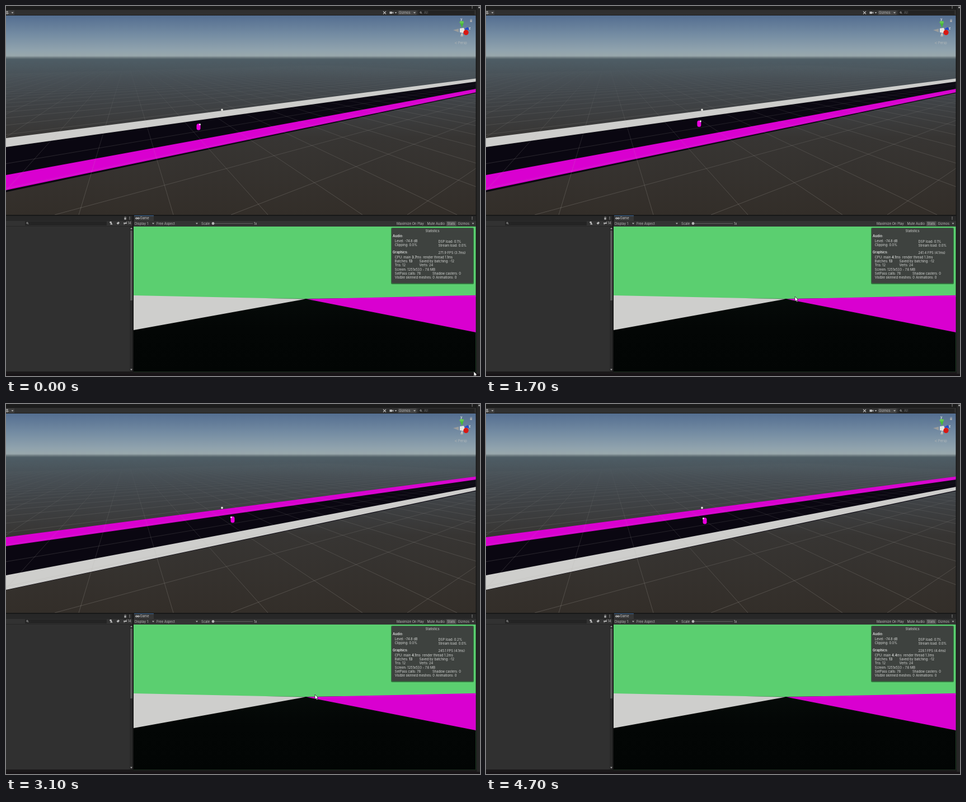
Recreate the animation shown at these times as an HTML page with a canvas. Size 847 by 661 pixels, loop 4.8 s.

```html
<!DOCTYPE html>
<html lang="en">
<head>
<meta charset="utf-8">
<title>Corridor editor</title>
<style>
html, body { margin: 0; width: 100%; height: 100%; overflow: hidden; background: #191919; }
canvas { display: block; }
</style>
</head>
<body>
<canvas id="stage" width="847" height="661"></canvas>
<script>
const c = document.getElementById('stage').getContext('2d');
const LOOP = 4800, FLIP = 2350;
const PINK = '#d900d0', WHITE = '#cececc', TEXT = '#b9b9b9';

// time, value(s)
const walk = [[0, 344], [1120, 344], [1200, 348], [2100, 407], [2340, 420], [2400, 419], [3100, 405], [3800, 391], [4800, 391]];
const mouse = [[0, 836, 653], [100, 830, 645], [600, 552, 519], [3700, 552, 519], [4000, 750, 416], [4200, 846, 366]];
// start, dsp, fps, frame ms, render ms
const stats = [
  [0, '0.1', '271.9', '3.7', '1.1'], [600, '0.2', '246.9', '4.1', '1.2'],
  [1700, '0.1', '241.4', '4.1', '1.3'], [2300, '0.2', '241.4', '4.1', '1.3'],
  [2700, '0.2', '245.1', '4.1', '1.2'], [3600, '0.2', '248.2', '4.0', '1.2'],
  [4400, '0.1', '228.1', '4.4', '1.3']
];

function track(keys, t, n = 1) {
  let i = 1;
  while (i < keys.length - 1 && keys[i][0] < t) i++;
  const a = keys[i - 1], b = keys[i];
  const k = Math.min(1, Math.max(0, (t - a[0]) / (b[0] - a[0])));
  return a[n] + (b[n] - a[n]) * k;
}
function box(x, y, w, h, fill) {
  c.fillStyle = fill;
  c.fillRect(x, y, w, h);
}
function poly(fill, ...p) {
  c.fillStyle = fill;
  c.beginPath();
  for (let i = 0; i < p.length; i += 2) c.lineTo(p[i], p[i + 1]);
  c.closePath();
  c.fill();
}
function dot(x, y, rx, ry, fill) {
  c.fillStyle = fill;
  c.beginPath();
  c.ellipse(x, y, rx, ry, 0, 0, Math.PI * 2);
  c.fill();
}
function line(x1, y1, x2, y2, stroke, w = 1) {
  c.strokeStyle = stroke;
  c.lineWidth = w;
  c.beginPath();
  c.moveTo(x1, y1);
  c.lineTo(x2, y2);
  c.stroke();
}
function text(s, x, y, fill = TEXT, weight = 400, align = 'left') {
  c.font = weight + ' 5.8px Inter, sans-serif';
  c.fillStyle = fill;
  c.textAlign = align;
  c.textBaseline = 'alphabetic';
  c.fillText(s, x, y + 2.1);
  return x + c.measureText(s).width;
}
function arrow(x, y, dir = 1) {
  poly('#b0b0b0', x - 2, y - dir, x + 2, y - dir, x, y + 1.4 * dir);
}
function kebab(x, y) {
  for (let i = -1; i < 2; i++) dot(x, y + i * 2.1, 0.7, 0.7, '#b8b8b8');
}
function lens(x, y) {
  c.strokeStyle = '#b0b0b0';
  c.lineWidth = 0.8;
  c.beginPath();
  c.arc(x, y, 1.3, 0, 7);
  c.moveTo(x + 1, y + 1);
  c.lineTo(x + 2.4, y + 2.4);
  c.stroke();
}
function lock(x, y) {
  box(x - 1.7, y, 3.4, 2.6, '#b0b0b0');
  c.strokeStyle = '#b0b0b0';
  c.lineWidth = 0.7;
  c.strokeRect(x - 1, y - 2, 2.2, 2);
}

function gradient(y0, y1, stops) {
  const g = c.createLinearGradient(0, y0, 0, y1);
  for (const [y, col] of stops) g.addColorStop((y - y0) / (y1 - y0), col);
  return g;
}
const ground = gradient(17, 373, [
  [17, '#546e90'], [50, '#738ba2'], [78, '#8fa2ad'], [89, '#99a8ac'], [92, '#6f7d82'],
  [95, '#4e5d65'], [130, '#464e54'], [175, '#3f4245'], [235, '#373533'], [373, '#332e29']]);
const haze = gradient(95, 373, [
  [100, 'rgba(170,175,175,0)'], [140, 'rgba(170,172,170,.06)'],
  [200, 'rgba(175,173,168,.18)'], [373, 'rgba(180,175,168,.32)']]);
const floor = gradient(520, 654, [
  [520, '#060b09'], [575, '#030605'], [654, '#020504']]);

function grid() {
  for (let k = -24; k < 40; k++) line(215, 91, 130 + 169 * k, 373, haze, 0.8);
  for (let k = -30; k < 5; k++) line(1134, 91, 87 + 315 * k, 373, haze, 0.8);
}

function gizmo() {
  poly('#9a9d9d', 799, 43, 809, 40.5, 809, 47);
  poly('#c9cbc9', 812, 54, 817, 54, 815, 47);
  dot(814.5, 53.5, 2.6, 1.3, '#a8aaa8');
  poly('#48b83c', 810.5, 29, 818, 29, 815, 39);
  dot(814.3, 29, 3.8, 2.2, '#63c84f');
  poly('#2549cc', 818, 42, 825, 37.5, 828, 43);
  poly('#e4e5e2', 811, 40, 818, 39, 820, 44, 817, 48, 811, 47);
  dot(822, 47.3, 4.6, 4.8, '#d91812');
  text('y', 812, 23.5, '#e6e6e6', 600);
  text('z', 827, 40, '#e6e6e6', 600);
  lock(831, 26);
  line(806, 64.3, 802, 66, '#a9b0b2', 0.7);
  line(802, 66, 806, 67.7, '#a9b0b2', 0.7);
  text('Persp', 808, 66, '#b3b9ba');
}

function sceneView(t) {
  const flipped = t >= FLIP, d = flipped ? 2 : 0;
  c.save();
  c.beginPath();
  c.rect(0, 17, 839.5, 356);
  c.clip();
  box(0, 17, 840, 356, ground);
  poly('#0a0711', 0, 245, 840, 132, 840, 155.5, 0, 332.5);
  poly(flipped ? PINK : WHITE, 0, 236 + d, 840, 129.5, 840, 135, 0, 252 + d);
  poly(flipped ? WHITE : PINK, 0, 302 + 2 * d, 840, 148, 840, 154.3, 0, 329 + 1.5 * d);
  grid();
  dot(386, 185.5, 1.9, 1.9, '#d5d5cf');
  dot(386, 185.5, 0.9, 0.9, '#ffffff');
  const x = track(walk, t), y = 215.2 - (x - 344) * 0.153;
  c.fillStyle = '#ea00df';
  c.beginPath();
  c.roundRect(x - 3.5, y - 5, 7, 11.5, 3.5);
  c.fill();
  dot(x + (flipped ? -2.6 : 2.5), y - 3.6, 1.4, 1.6, '#eee6ee');
  gizmo();
  c.restore();
}

function topBar() {
  box(0, 0, 847, 661, '#171717');
  box(841, 0, 6, 657, '#262626');
  dot(845.5, 2.5, 1.2, 1.8, '#b8b8b8');
  box(0, 0, 840, 7, '#1c1c1c');
  box(0, 7, 840, 10, '#303030');
  box(0, 16.2, 840, 0.8, '#1a1a1a');
  kebab(833, 2);
  box(0, 8, 15, 8, '#3e3e3e');
  line(0, 10, 4, 10, TEXT);
  line(0, 13, 5, 13, TEXT);
  line(2, 9, 2, 15, TEXT);
  arrow(11.5, 12);
  line(674, 9.5, 679, 14.5, TEXT, 1.1);
  line(679, 9.5, 674, 14.5, TEXT, 1.1);
  box(685.5, 10, 4.5, 4, TEXT);
  poly(TEXT, 690, 12, 692.3, 10, 692.3, 14);
  arrow(696.5, 12);
  box(700.5, 8, 33, 8, '#454545');
  text('Gizmos', 702, 12);
  arrow(730, 12);
  box(737, 8.3, 100, 7.4, '#232323');
  lens(741, 11.5);
  text('All', 747, 12, '#707070');
}

function sidePanel() {
  box(0, 373, 840, 2, '#181818');
  box(0, 375, 226, 9, '#272727');
  lock(213, 379);
  kebab(221, 379);
  box(0, 384, 226, 9.5, '#323232');
  box(34, 384.7, 146, 7.4, '#242424');
  lens(38, 387.7);
  dot(187, 386.5, 1.8, 1.8, TEXT);
  poly(TEXT, 186, 390.5, 190.5, 390.5, 188.3, 386.5);
  poly(TEXT, 197.5, 388, 201, 385.3, 203, 387.5, 200, 390.5);
  line(210, 388, 216, 388, TEXT, 1.8);
  line(210.5, 391, 216, 385, TEXT, 0.8);
  text('14', 217.5, 388);
  box(0, 393, 226, 260, '#303030');
  box(0, 393, 226, 0.8, '#232323');
  box(221, 394, 5, 259, '#292929');
  box(222, 401, 4, 125, '#565656');
  arrow(224, 397.5, -1);
  arrow(224, 649.5);
  box(226, 375, 2, 279, '#171717');
}

function gameBar() {
  box(228, 375, 612, 9, '#272727');
  box(229, 374.5, 35, 9.5, '#363636');
  box(229, 374.2, 35, 0.9, '#3a6ea5');
  dot(233.2, 379.2, 1.9, 1.8, '#cccccc');
  dot(236.8, 379.2, 1.9, 1.8, '#cccccc');
  dot(233.2, 379.2, 0.8, 0.8, '#363636');
  dot(236.8, 379.2, 0.8, 0.8, '#363636');
  text('Game', 239.5, 379.3, '#cccccc');
  kebab(833, 379);
  box(228, 384, 612, 10, '#333333');
  text('Display 1', 230, 388.5);
  arrow(263, 388.5);
  text('Free Aspect', 269, 388.5);
  arrow(341, 388.5);
  text('Scale', 349, 388.5);
  line(368, 388.5, 441, 388.5, '#666666', 0.9);
  dot(370, 388.5, 2.4, 2.4, '#b5b5b5');
  text('1x', 443, 388.5);
  text('Maximize On Play', 698, 388.5);
  text('Mute Audio', 752.5, 388.5);
  box(787, 384.5, 17.5, 8.5, '#505050');
  text('Stats', 788.5, 388.5);
  text('Gizmos', 807.5, 388.5);
  arrow(834.5, 388.5);
}

function statsPanel(t) {
  const [, dsp, fps, ms, render] = stats.filter(s => s[0] <= t).pop();
  const col = '#d2d4d2', x = 694.7;
  const put = (s, px, y, w) => text(s, px, y, col, w);
  c.fillStyle = 'rgba(20,40,25,.55)';
  c.beginPath();
  c.roundRect(688, 396, 148, 101, 2);
  c.fill();
  c.fillStyle = '#3e423f';
  c.beginPath();
  c.roundRect(689.3, 397, 145.5, 98, 2);
  c.fill();
  text('Statistics', 762, 402.3, col, 400, 'center');
  put('Audio:', 691, 411, 700);
  put('Level: -74.8 dB', x, 419.7);
  put('DSP load: ' + dsp + '%', 772.5, 421.3);
  put('Clipping: 0.0%', x, 427);
  put('Stream load: 0.0%', 772.5, 427.6);
  put('Graphics:', 691, 439.7, 700);
  put(fps + ' FPS (' + ms + 'ms)', 772.5, 441);
  let end = put('CPU: main ', x, 448.5);
  end = put(ms, end, 448.5, 700);
  put('ms  render thread ' + render + 'ms', end, 448.5);
  end = put('Batches: ', x, 456);
  put('13', end, 456, 700);
  put('Saved by batching: -12', 738.5, 456);
  put('Tris: 12', x, 463.2);
  put('Verts: 24', 738.5, 463.2);
  put('Screen: 1251x533 - 7.6 MB', x, 470.5);
  put('SetPass calls: 78', x, 478);
  put('Shadow casters: 0', 762, 478);
  put('Visible skinned meshes: 0', x, 485.3);
  put('Animations: 0', 768, 485.3);
}

function gameView(t) {
  box(228, 394, 611.5, 259.5, '#5bcf70');
  poly(floor, 228, 520, 535, 523, 839.5, 520, 839.5, 653.5, 228, 653.5);
  poly(WHITE, 228, 517, 535, 523.6, 228, 579);
  poly(PINK, 537, 523.5, 839.5, 516.8, 839.5, 583);
  statsPanel(t);
  box(0, 653.5, 840, 7.5, '#1b191a');
  box(0, 657, 847, 4, '#171316');
}

function cursor(t) {
  if (t >= 4200) return;
  const x = track(mouse, t), y = track(mouse, t, 2);
  c.save();
  c.translate(x, y);
  c.beginPath();
  for (const [px, py] of [[0, 0], [0, 8.6], [2, 6.8], [3.5, 9.8], [4.9, 9.1], [3.5, 6.2], [6, 6]]) c.lineTo(px, py);
  c.closePath();
  c.fillStyle = '#ffffff';
  c.fill();
  c.strokeStyle = '#151515';
  c.lineWidth = 0.7;
  c.stroke();
  c.restore();
}

const start = performance.now();
function frame() {
  const t = (performance.now() - start) % LOOP;
  topBar();
  sceneView(t);
  sidePanel();
  gameBar();
  gameView(t);
  cursor(t);
  requestAnimationFrame(frame);
}
frame();
</script>
</body>
</html>
```
